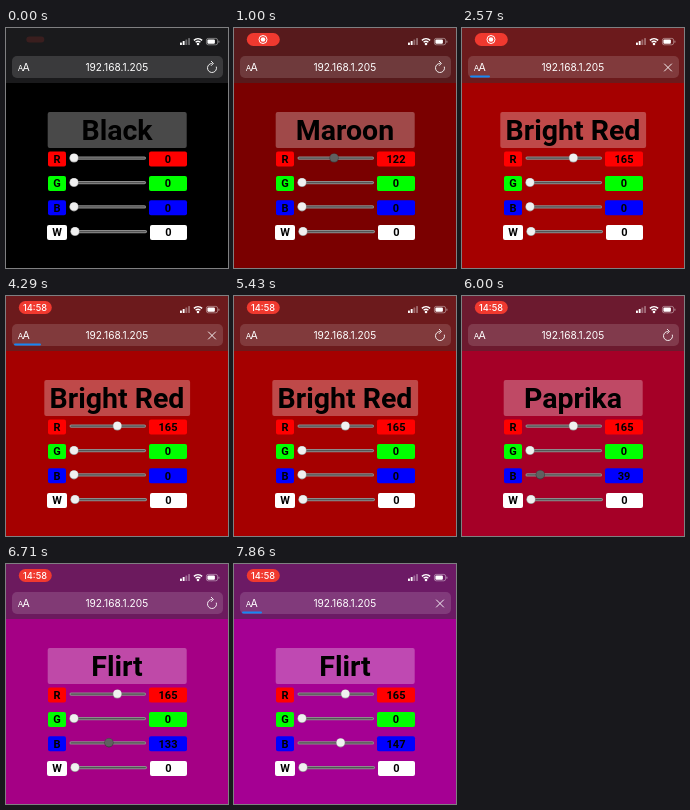
These frames come from a looping animation (222x240 px, 8000 ms). An HTML page with a canvas:

```html
<!DOCTYPE html>
<html lang="en">
<head>
<meta charset="utf-8">
<title>LED colour sliders</title>
<style>
html, body { margin: 0; height: 100%; overflow: hidden; background: #000; }
canvas { display: block; width: 100vw; height: 100vh; }
</style>
</head>
<body>
<canvas></canvas>
<script>
const LOOP = 8000, FPS = 7, W = 222, H = 240;
const canvas = document.querySelector('canvas');
const ctx = canvas.getContext('2d');
const ratio = window.devicePixelRatio || 1;
canvas.width = W * ratio;
canvas.height = H * ratio;

// Keys are [time in ms, value]
const RED = [[140, 0], [570, 58], [1000, 122], [1428, 154], [1860, 165]];
const BLUE = [[5714, 0], [6285, 77], [6570, 118], [6857, 147]];
const LOADING = [[2280, 8], [2570, 28], [4290, 35], [4710, 40], [5000, 216]];
const RELOADING = [[7420, 8], [7857, 28]];

// Names by the lowest channel value at which they apply
const RED_NAMES = [[0, 'Black'], [1, 'Diesel'], [46, 'Rustic Red'], [91, 'Lonestar'],
  [119, 'Maroon'], [136, 'Red Berry'], [145, 'Sangria'], [162, 'Bright Red']];
const BLUE_NAMES = [[1, 'Paprika'], [67, 'Fresh Eggplant'], [91, 'Flirt']];

const clamp = v => Math.max(0, Math.min(1, v));
const within = (t, a, b) => t >= a && t < b;

function track(keys, t) {
  let value = keys[0][1];
  for (let i = 1; i < keys.length; i++) {
    const [t0, v0] = keys[i - 1], [t1, v1] = keys[i];
    if (t >= t0) value = v0 + (v1 - v0) * clamp((t - t0) / (t1 - t0));
  }
  return value;
}

function colorName(r, b) {
  const [names, level] = b ? [BLUE_NAMES, b] : [RED_NAMES, r];
  return names.filter(([from]) => level >= from).pop()[1];
}

function box(x, y, w, h, radius, fill) {
  ctx.fillStyle = fill;
  ctx.beginPath();
  ctx.roundRect(x, y, w, h, radius);
  ctx.fill();
}

function disc(x, y, radius, fill) {
  ctx.fillStyle = fill;
  ctx.beginPath();
  ctx.arc(x, y, radius, 0, 2 * Math.PI);
  ctx.fill();
}

function arc(x, y, radius, from, to, width) {
  ctx.strokeStyle = '#fff';
  ctx.lineWidth = width;
  ctx.beginPath();
  ctx.arc(x, y, radius, from, to);
  ctx.stroke();
}

function line(...points) {
  ctx.beginPath();
  points.forEach(([x, y]) => ctx.lineTo(x, y));
  ctx.stroke();
}

function text(string, x, y, font, fill = '#fff') {
  ctx.font = font + ', sans-serif';
  ctx.fillStyle = fill;
  ctx.textAlign = 'center';
  ctx.fillText(string, x, y);
}

function recordingPill(t) {
  const grow = clamp(t / 290);
  const w = 18 + 15 * grow, h = 6 + 7 * grow;
  ctx.globalAlpha = 0.15 + 0.85 * grow;
  box(29.3 - w / 2, 11.5 - h / 2, w, h, h / 2, '#f0392f');
  const clock = clamp((t - 3420) / 290);
  ctx.globalAlpha = grow * (1 - clock);
  arc(29, 11.5, 4, 0, 2 * Math.PI, 1);
  disc(29, 11.5, 2.3, '#fff');
  ctx.globalAlpha = clock;
  text('14:58', 29, 14.9, '500 9.2px Inter');
  ctx.globalAlpha = 1;
}

function statusIcons() {
  for (let i = 0; i < 4; i++) {
    const h = 2.5 + i * 1.5;
    box(174 + i * 2.7, 17 - h, 1.9, h, 0.5, i < 2 ? '#fff' : 'rgba(255,255,255,.35)');
  }
  for (const radius of [3.6, 6.2]) arc(192, 17, radius, -2.3, -0.84, 1.4);
  disc(192, 16, 1.3, '#fff');
  ctx.strokeStyle = 'rgba(255,255,255,.5)';
  ctx.lineWidth = 0.8;
  ctx.beginPath();
  ctx.roundRect(200.4, 10.4, 11.2, 6.4, 1.8);
  ctx.stroke();
  box(201.4, 11.4, 7.5, 4.4, 1, '#fff');
  box(212.4, 12.4, 1, 2.4, 0.5, 'rgba(255,255,255,.5)');
}

function addressBar(t) {
  box(6, 28, 211, 22, 5, 'rgba(255,255,255,.14)');
  text('A', 14.5, 43, '400 8px Inter');
  text('A', 20, 43, '400 10.5px Inter');
  text('192.168.1.205', 110.8, 43, '400 10.15px Inter');

  const loading = within(t, 2280, 5140), reloading = t >= 7420;
  if (loading || reloading) {
    const end = track(loading ? LOADING : RELOADING, t);
    box(8, 47.5, end - 8, 2, 1, '#1687f5');
    ctx.strokeStyle = '#fff';
    ctx.lineWidth = 0.9;
    line([202.2, 35.7], [209.8, 43.3]);
    line([209.8, 35.7], [202.2, 43.3]);
  } else {
    arc(206, 40, 4.5, -0.3, 4.8, 0.9);
    line([205, 33], [207.4, 35.4], [205, 37.8]);
  }
}

function slider(label, y, color, value, dragging) {
  const wide = label === 'W' ? 1 : 0;
  box(42 - wide, y - 7, 18 + 2 * wide, 15, 2, color);
  text(label, 51, y + 4.4, '700 11px Roboto', '#000');
  box(143 + wide, y - 7, 38 - wide, 15, 2, color);
  text(value, 162 + wide / 2, y + 4.4, '700 11px Roboto', '#000');

  box(63.5 + wide, y - 2, 76.5, 3.2, 1.6, '#8c8c8c');
  box(64.5 + wide, y - 1.1, 74.5, 1.4, 0.7, '#555');
  const x = 68 + wide + 67 * value / 255;
  disc(x, y - 0.5, 4.6, dragging ? '#3c3c3c' : '#999');
  disc(x, y - 0.7, 4, dragging ? '#606060' : '#f0f0f0');
}

function draw(t) {
  const r = Math.round(track(RED, t)), b = Math.round(track(BLUE, t));
  ctx.setTransform(canvas.width / W, 0, 0, canvas.height / H, 0, 0);
  ctx.fillStyle = `rgb(${r},0,${b})`;
  ctx.fillRect(0, 0, W, H);
  ctx.fillStyle = 'rgba(52,52,56,.5)';
  ctx.fillRect(0, 0, W, 55);

  recordingPill(t);
  statusIcons();
  addressBar(t);

  const name = colorName(r, b);
  ctx.font = '700 28.5px Roboto, sans-serif';
  const panel = Math.max(139, ctx.measureText(name).width + 11);
  box(111.2 - panel / 2, 84, panel, 36, 2, 'rgba(255,255,255,.285)');
  text(name, 111, 111.7, '700 28.5px Roboto', '#000');

  slider('R', 130.5, '#f00', r, within(t, 140, 2000));
  slider('G', 155, '#0f0', 0, false);
  slider('B', 179.3, '#00f', b, within(t, 5714, 7140));
  slider('W', 204, '#fff', 0, false);
}

function tick() {
  // The picture advances in held steps, like a screen recording
  const step = Math.floor((performance.now() % LOOP) * FPS / 1000 + 0.03);
  draw(step * 1000 / FPS % LOOP);
  requestAnimationFrame(tick);
}
tick();
</script>
</body>
</html>
```
